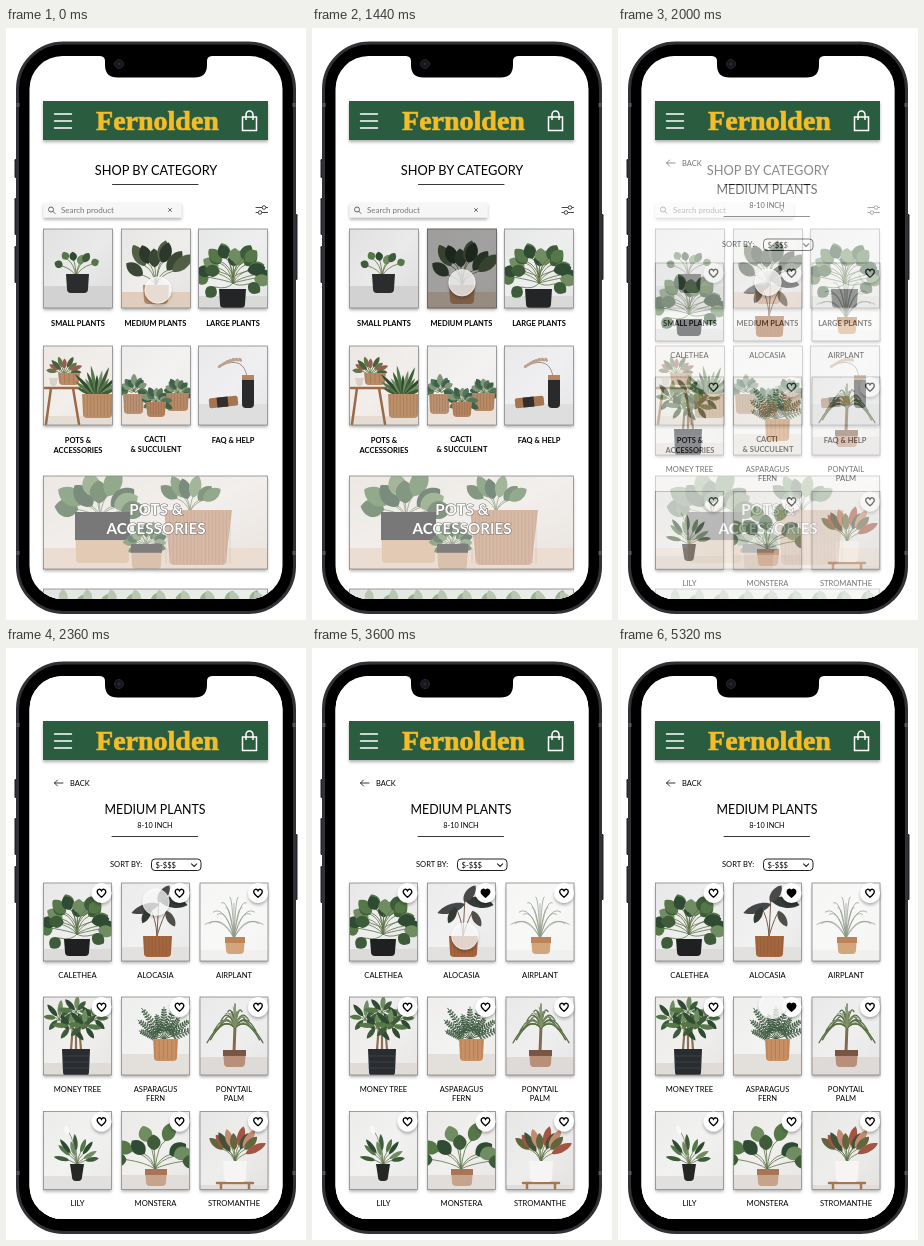
These frames come from a looping animation (300 by 592 pixels, 5.36 s). An HTML page:

```html
<!DOCTYPE html>
<html lang="en">
<head>
<meta charset="utf-8">
<title>Plant shop</title>
<style>
html, body { margin: 0; width: 100%; height: 100%; overflow: hidden; background: #fff; }
svg { display: block; }
text { font-family: Lato, "Open Sans", sans-serif; }
.logo { font-family: "Liberation Serif", "Noto Serif", serif; }
</style>
</head>
<body>
<svg id="stage" width="300" height="592" viewBox="0 0 300 592"></svg>
<script>
const LOOP = 5360;
const GREENS = ['#3e5c3a', '#567849', '#2f4b33', '#6f8d60'];
const DARK = ['#3a4735', '#515f47', '#2b382b'];

const random = seed => () => (seed = (seed * 16807) % 2147483647) / 2147483647;
const range = (n, draw) => Array.from({ length: n }, (_, i) => draw(i)).join('');
const rect = (x, y, w, h, fill, extra = '') =>
  `<rect x="${x}" y="${y}" width="${w}" height="${h}" fill="${fill}" ${extra}/>`;
const line = (d, color = '#222', width = 1) =>
  `<path d="${d}" fill="none" stroke="${color}" stroke-width="${width}" stroke-linecap="round"/>`;
const text = (x, y, size, label, extra = 'text-anchor="middle"') =>
  `<text x="${x}" y="${y}" font-size="${size}" ${extra}>${label}</text>`;
const bold = (x, y, label) => text(x, y, 7.5, label, 'text-anchor="middle" font-weight="700"');

const leaf = (x, y, angle, len, w, fill) =>
  `<path transform="translate(${x} ${y}) rotate(${angle})" fill="${fill}"
    d="M0 0C${w} ${-len * .2} ${w} ${-len * .75} 0 ${-len}C${-w} ${-len * .75} ${-w} ${-len * .2} 0 0"/>`;

// Leaves on stems that spread out from one point.
function fan(x, y, { n = 7, spread = 70, lean = 0, stem = 18, len = 14, w = 5, bend = 1.2,
  colors = GREENS, stalk = '#5d7145', seed = 7 }) {
  const rnd = random(seed * 7919);
  rnd();
  return range(n, i => {
    const deg = lean - spread + 2 * spread * i / Math.max(1, n - 1) + (rnd() - .5) * 14;
    const a = deg * Math.PI / 180, r = stem * (.65 + .5 * rnd());
    const px = x + r * Math.sin(a), py = y - r * Math.cos(a);
    return line(`M${x} ${y}Q${x + (px - x) * .3} ${py + 3} ${px} ${py}`, stalk, .8) +
      leaf(px, py, deg * bend, len * (.8 + .35 * rnd()), w, colors[i % colors.length]);
  });
}

// Thin arching blades.
const grass = (x, y, n, reach, height, fall, color, width) => range(n, i => {
  const s = 2 * i / (n - 1) - 1, h = height * (1 - .45 * s * s) * (i % 2 ? .8 : 1);
  return line(`M${x} ${y}Q${x + s * reach * .45} ${y - h} ${x + s * reach} ${y - h + fall * Math.abs(s)}`, color, width);
});

function pot(x, y, w, h, fill, { taper = 1, ribs = 0, rim, rimPart = .35 } = {}) {
  return `<path d="M${x} ${y}h${w}l${-taper} ${h - 4}q0 4 -4 4h${8 - w + 2 * taper}q-4 0 -4 -4z" fill="${fill}"/>` +
    (rim ? rect(x, y, w, h * rimPart, rim) : '') +
    range(ribs, i => line(`M${x + 2 + (w - 4) * i / (ribs - 1)} ${y + 1}v${h - 3}`, '#70452c55', .7));
}

const photo = (x, y, w, h, wall, table, horizon, content) =>
  rect(x, y, w, h, '#fff', 'filter="url(#shadow)"') +
  `<svg x="${x}" y="${y}" width="${w}" height="${h}" viewBox="${x} ${y} ${w} ${h}">
    ${rect(x, y, w, h, wall)}${rect(x, y, w, h, 'url(#light)')}${rect(x, horizon, w, h, table)}${content}</svg>` +
  rect(x, y, w, h, 'none', 'stroke="#858585" stroke-width=".8"');

const bigPlant = (x, y, seed) =>
  fan(x, y, { n: 13, spread: 100, stem: 23, len: 16, w: 8, bend: 1.35, seed }) +
  fan(x, y - 6, { n: 7, spread: 65, stem: 19, len: 17, w: 8, seed: seed + 3 });

function categoryPage() {
  const tan = '#b98a66';
  const small = photo(37.5, 201, 69, 79, '#dcdcdc', '#d2d2d2', 258,
    fan(70, 248, { n: 6, spread: 55, stem: 18, len: 10, w: 5, seed: 4 }) + pot(60, 246, 23, 19, '#2b2c2e'));
  const medium = photo(115.5, 201, 69, 79, '#e4e2e0', '#e0cdbd', 264,
    fan(150, 257, { n: 8, spread: 50, stem: 22, len: 23, w: 8, bend: 1, colors: DARK, seed: 5 }) +
    pot(137, 257, 26, 19, tan));
  const large = photo(192.5, 201, 69, 79, '#e2e3e3', '#d9d9d8', 268,
    bigPlant(227, 255, 2) + pot(213, 261, 27, 19, '#232527'));
  const stool = photo(37.5, 318, 69, 79, '#e9e3de', '#e5dcd3', 388,
    line('M39 360H74M45 360L40 396M67 360L73 396', '#9b6a48', 2.5) +
    fan(58, 346, { n: 9, spread: 75, stem: 7, len: 12, w: 3, colors: ['#65744c', '#985d4c', '#475f3b'], seed: 6 }) +
    pot(52, 345, 22, 12, tan, { ribs: 5 }) + pot(43, 350, 9, 8, '#d9d0c8') +
    range(13, i => leaf(91, 369, -66 + i * 11, 22 + i % 3 * 5, 2.4, GREENS[i % 4])) +
    pot(76, 366, 31, 24, '#bd9069', { ribs: 9 }));
  const rosette = (x, y, seed) =>
    fan(x, y, { n: 11, spread: 95, stem: 5, len: 11, w: 4, seed, colors: ['#567557', '#3d6149', '#80977b'] });
  const cacti = photo(115.5, 318, 69, 79, '#ebe9e8', '#eae2db', 377,
    rosette(172, 365, 4) + pot(160, 365, 23, 18, tan, { ribs: 7 }) +
    rosette(128, 363, 3) + pot(117, 366, 21, 20, '#ba9274', { ribs: 7 }) +
    rosette(150, 374, 8) + pot(140, 374, 20, 15, '#b58460', { ribs: 7 }));
  const help = photo(192.5, 318, 69, 79, '#e5e5e8', '#dfdede', 376,
    line('M241 349Q238 328 216 337', '#8d7a69', .8) +
    range(8, i => leaf(216 + i * 2.8, 337 - Math.sin(i / 3.2) * 4, -120 + i * 12, 5, 2, '#b9a18d')) +
    pot(236, 347, 12, 33, '#2a2a2d', { taper: 0, rim: '#b68663', rimPart: .15 }) +
    rect(203, 369, 29, 10, '#a4754f', 'rx="2" transform="rotate(-6 217 374)"') +
    rect(211, 369, 11, 10, '#332d2b', 'transform="rotate(-6 217 374)"'));
  const banner = photo(37.5, 448, 224, 93, '#dcd4cd', '#dfc9b8', 520,
    fan(94, 490, { n: 9, spread: 75, stem: 21, len: 28, w: 12, seed: 3 }) +
    fan(184, 484, { n: 6, spread: 48, stem: 18, len: 22, w: 8, seed: 9 }) +
    pot(69, 484, 55, 51, '#d3ab8a', { rim: '#2c2c2d', rimPart: .55 }) +
    pot(158, 482, 68, 55, '#c09272', { taper: 6, ribs: 19 }) +
    fan(140, 517, { n: 13, spread: 95, stem: 9, len: 14, w: 5, seed: 5 }) +
    pot(125, 516, 31, 25, '#c49d7e', { rim: '#343331' }) +
    rect(37, 448, 226, 94, '#fff', 'opacity=".36"'));
  const next = photo(37.5, 561, 224, 60, '#dce1da', '#dce1da', 600,
    range(18, i => leaf(45 + i * 12.5, 577, -55 + i * 53 % 110, 16, 6, ['#9aaf94', '#b8c6b2'][i % 2])));
  const title = 'text-anchor="middle" font-weight="700" fill="#fff" stroke="#777" stroke-width="1.2" paint-order="stroke"';
  return rect(20, 20, 260, 554, '#fff') +
    text(150, 147, 12.8, 'SHOP BY CATEGORY') + line('M106.5 156.5H192', '#222', .9) +
    rect(37.5, 174.5, 138, 15, '#f6f6f6', 'rx="1" filter="url(#shadow)"') +
    `<circle cx="45" cy="181.5" r="2.5" fill="none" stroke="#444" stroke-width=".8"/>` +
    line('M47 183.5L49 185.5M162.5 180.5l3 3m0 -3l-3 3', '#444', .8) +
    text(55, 184.7, 8, 'Search product', 'fill="#777"') +
    line('M250 179.5h6m4 0h1.5M250 184.5h2m4 0h5.5', '#333', .9) +
    `<g fill="#fff" stroke="#333" stroke-width=".9"><circle cx="258" cy="179.5" r="1.8"/><circle cx="254" cy="184.5" r="1.8"/></g>` +
    small + medium + large + stool + cacti + help + banner + next +
    rect(115, 200.5, 70, 80, '#000', 'id="press" opacity=".32"') +
    bold(72, 297.5, 'SMALL PLANTS') + bold(149.5, 297.5, 'MEDIUM PLANTS') + bold(227, 297.5, 'LARGE PLANTS') +
    bold(72, 414.5, 'POTS &amp;') + bold(72, 424.5, 'ACCESSORIES') +
    bold(149, 413.5, 'CACTI') + bold(150, 423.5, '&amp; SUCCULENT') + bold(227, 414.5, 'FAQ &amp; HELP') +
    text(150, 487, 15.2, 'POTS &amp;', title) + text(150, 506, 15.2, 'ACCESSORIES', title);
}

const columns = [37.5, 115.5, 194], rows = [235, 349, 463.5];

function heart(col, row) {
  const x = columns[col] + 58, y = rows[row] + 10;
  return `<circle cx="${x}" cy="${y}" r="10" fill="#fff" filter="url(#shadow)"/>
    <path id="heart${col}${row}" transform="translate(${x} ${y})" stroke="#000" stroke-width="1.4" fill="#fff"
      d="M0 4.2C-2.4 2.3 -4.3 .7 -4.3 -1.3C-4.3 -4 -1.2 -4.6 0 -2.2C1.2 -4.6 4.3 -4 4.3 -1.3C4.3 .7 2.4 2.3 0 4.2Z"/>`;
}

function productPage() {
  const product = (col, row, wall, table, horizon, art, ...label) =>
    photo(columns[col], rows[row], 68, 78, wall, table, horizon, art) + heart(col, row) +
    label.map((s, i) => text(columns[col] + 34, rows[row] + 94.5 + i * 9.5, 7.6, s)).join('');
  const trunk = [-5, 0, 5].map(d => line(`M${70 + d} 402L${70 + d * .6} 376`, '#8a7055', 2.2)).join('');
  const frond = (x, y, angle, len) => `<g transform="translate(${x} ${y}) rotate(${angle})">` +
    line(`M0 0V${-len}`, '#425d43', .8) +
    range(9, i => leaf(0, -len * (.25 + i * .08), 65, 6 - i * .4, 1.2, '#566f57') +
      leaf(0, -len * (.25 + i * .08), -65, 6 - i * .4, 1.2, '#405c44')) + '</g>';
  return rect(20, 20, 260, 554, '#fff') +
    line('M48.5 135H57M51.5 132L48.5 135L51.5 138', '#222', .9) + text(64, 137.7, 7.5, 'BACK', '') +
    text(149, 166, 12.4, 'MEDIUM PLANTS') + text(149, 180, 7.3, '8-10 INCH') + line('M106 188.5H191.5', '#222', .9) +
    text(104, 219.3, 7.6, 'SORT BY:', '') +
    rect(145.5, 211, 49.5, 11.5, '#fff', 'rx="3.5" stroke="#222" stroke-width="1"') +
    text(149.5, 219.5, 7.6, '$-$$$', '') + line('M185.5 215.8l2.6 2.6l2.6 -2.6', '#222', 1.1) +
    product(0, 0, '#e4e4e4', '#dcdbda', 301, bigPlant(71, 286, 2) + pot(58, 291, 26, 17, '#1f2022'), 'CALETHEA') +
    product(1, 0, '#e9e8e8', '#e3e1e0', 299,
      line('M151 288L153 249M151 288Q150 269 143 259M151 288Q157 268 161 263', '#795a49', 1) +
      leaf(153, 256, -108, 29, 6, '#45474a') + leaf(153, 252, 100, 29, 7, '#343a38') +
      leaf(152, 254, 35, 20, 6, '#4b4947') + leaf(144, 259, -155, 18, 5, '#333a34') + leaf(160, 263, 150, 18, 5, '#50504b') +
      pot(137, 288, 29, 21, '#a3663f', { ribs: 8 }), 'ALOCASIA') +
    product(2, 0, '#f4f4f3', '#f0f0ef', 302,
      grass(228, 290, 15, 29, 43, 10, '#8d9787', .7) + pot(219, 289, 20, 17, '#d2a57b', { rim: '#bd8459' }), 'AIRPLANT') +
    product(0, 1, '#e7e6e4', '#dfdbd7', 415,
      trunk + [[53, 371], [70, 364], [87, 371], [65, 379], [78, 378]].map(([x, y], i) =>
        fan(x, y, { n: 7, spread: 115, stem: 3, len: 15, w: 3.4, seed: i + 2 })).join('') +
      pot(56, 401, 28, 27, '#292c30') + range(3, i => line(`M57 ${408 + i * 6}H83`, '#464b50', .7)), 'MONEY TREE') +
    product(1, 1, '#ebebea', '#e3dfdb', 406,
      range(9, i => frond(158, 391, -72 + i * 18, 26 + i % 3 * 6)) + pot(147, 391, 25, 22, '#c89064', { ribs: 6 }),
      'ASPARAGUS', 'FERN') +
    product(2, 1, '#e5e5e5', '#dedad8', 409,
      line('M228 404L229 378', '#826c50', 3) +
      grass(229, 380, 17, 28, 24, 28, '#566e43', 1.3) + grass(229, 379, 10, 18, 22, 11, '#81916a', 1) +
      pot(217, 402, 23, 17, '#b88f78', { rim: '#795543' }), 'PONYTAIL', 'PALM') +
    product(0, 2, '#e9e9e8', '#e2e0df', 528,
      fan(71, 516, { n: 9, spread: 60, stem: 12, len: 17, w: 3, seed: 8 }) +
      line('M71 516Q69 493 62 483', '#778969', .8) + leaf(62, 487, -15, 10, 3, '#fafaf4') +
      pot(64, 516, 14, 17, '#252727', { taper: 2 }), 'LILY') +
    product(1, 2, '#e7e6e4', '#e1ddd9', 527,
      fan(149, 521, { n: 9, spread: 78, stem: 27, len: 19, w: 9, bend: 1.25, seed: 3 }) +
      pot(139, 521, 22, 17, '#c7a38a', { rim: '#a97454' }), 'MONSTERA') +
    product(2, 2, '#e3e2e1', '#e0dddb', 537,
      line('M211 535H247M215 535V546M243 535V546', '#a6764f', 2.5) +
      fan(229, 514, { n: 10, spread: 48, stem: 16, len: 20, w: 5, seed: 6, colors: ['#61663d', '#a45442', '#425238', '#c58b72'] }) +
      pot(217, 513, 24, 21, '#f7f5f3'), 'STROMANTHE');
}

const header = rect(37, 73, 225, 39, '#2c5b3f', 'filter="url(#shadow)"') +
  line('M48.5 86H65.5M48.5 93H65.5M48.5 100H65.5', '#fff', 1.4) +
  text(151.5, 101.5, 28, 'Fernolden',
    'class="logo" text-anchor="middle" font-weight="700" fill="#f4bd27" stroke="#f4bd27" stroke-width=".7"') +
  `<path d="M236.5 89h14v13.5h-14zM240 92v-5.5a3.5 3.5 0 0 1 7 0V92" fill="none" stroke="#fff" stroke-width="1.5"/>`;

const phone = [[8.5, 131, 19], [8.5, 170, 37], [8.5, 218, 37], [287, 186, 66]].map(([x, y, h]) =>
    rect(x, y, 4.5, h, '#242528', 'rx="1.2"')).join('') +
  rect(11.5, 15, 277, 569.5, '#000', 'rx="46" stroke="#303235" stroke-width="3"') +
  [75, 523].map(y => rect(10.5, y, 3, 4, '#55585b') + rect(286.5, y, 3, 4, '#55585b')).join('');

const notch = `<path d="M94 26H206V28Q201 28.5 201 33V37Q201 49.5 188.5 49.5H111.5Q99 49.5 99 37V33Q99 28.5 94 28Z"/>
  <circle cx="113" cy="36" r="4.5" fill="#15171b" stroke="#25272b"/><circle cx="113" cy="36" r="1.7" fill="#20283a"/>`;

const stage = document.getElementById('stage');
stage.innerHTML = `<defs>
  <filter id="shadow" x="-20%" y="-20%" width="140%" height="150%">
    <feDropShadow dx="0" dy="2.2" stdDeviation="1.8" flood-opacity=".3"/></filter>
  <linearGradient id="light" x2="1" y2="1"><stop stop-color="#fff" stop-opacity=".15"/>
    <stop offset=".5" stop-color="#fff" stop-opacity=".4"/><stop offset="1" stop-color="#fff" stop-opacity="0"/></linearGradient>
  <clipPath id="screen"><rect x="23.5" y="28" width="253" height="543" rx="33"/></clipPath></defs>
  ${phone}<g clip-path="url(#screen)">${categoryPage()}<g id="products">${productPage()}</g>${header}
  <circle id="cursor" r="13.2" fill="#fff" fill-opacity=".7" stroke="#fff" stroke-opacity=".6" filter="url(#shadow)"/></g>${notch}`;

const [press, products, cursor, firstHeart, secondHeart] =
  ['press', 'products', 'cursor', 'heart10', 'heart11'].map(id => document.getElementById(id));

// Time, x and y of each place where the pointer slows down.
const cursorPath = [[0, 152, 262], [700, 150, 255], [2560, 150, 254], [3040, 173, 246], [3400, 172, 248],
  [3900, 118, 361], [4080, 189, 359], [4480, 180, 362], [5200, 180, 362], [5340, 153, 357]];
const ease = t => t * t * (3 - 2 * t);
const progress = (t, from, to) => ease(Math.min(1, Math.max(0, (t - from) / (to - from))));

function cursorAt(t) {
  const i = cursorPath.findIndex(key => key[0] > t);
  if (i < 0) return cursorPath.at(-1).slice(1);
  const [t0, x0, y0] = cursorPath[i - 1], [t1, x1, y1] = cursorPath[i];
  const p = progress(t, t0, t1);
  return [x0 + (x1 - x0) * p, y0 + (y1 - y0) * p];
}

function render(t) {
  press.style.display = t >= 1440 && t < 1520 ? '' : 'none';
  products.setAttribute('opacity', progress(t, 1600, 2360));
  firstHeart.setAttribute('fill', t >= 3240 ? '#000' : '#fff');
  secondHeart.setAttribute('fill', t >= 4680 ? '#000' : '#fff');
  cursor.setAttribute('transform', `translate(${cursorAt(t).join(' ')})`);
}

const start = performance.now();
function tick() {
  render((performance.now() - start) % LOOP);
  requestAnimationFrame(tick);
}
tick();
</script>
</body>
</html>
```
